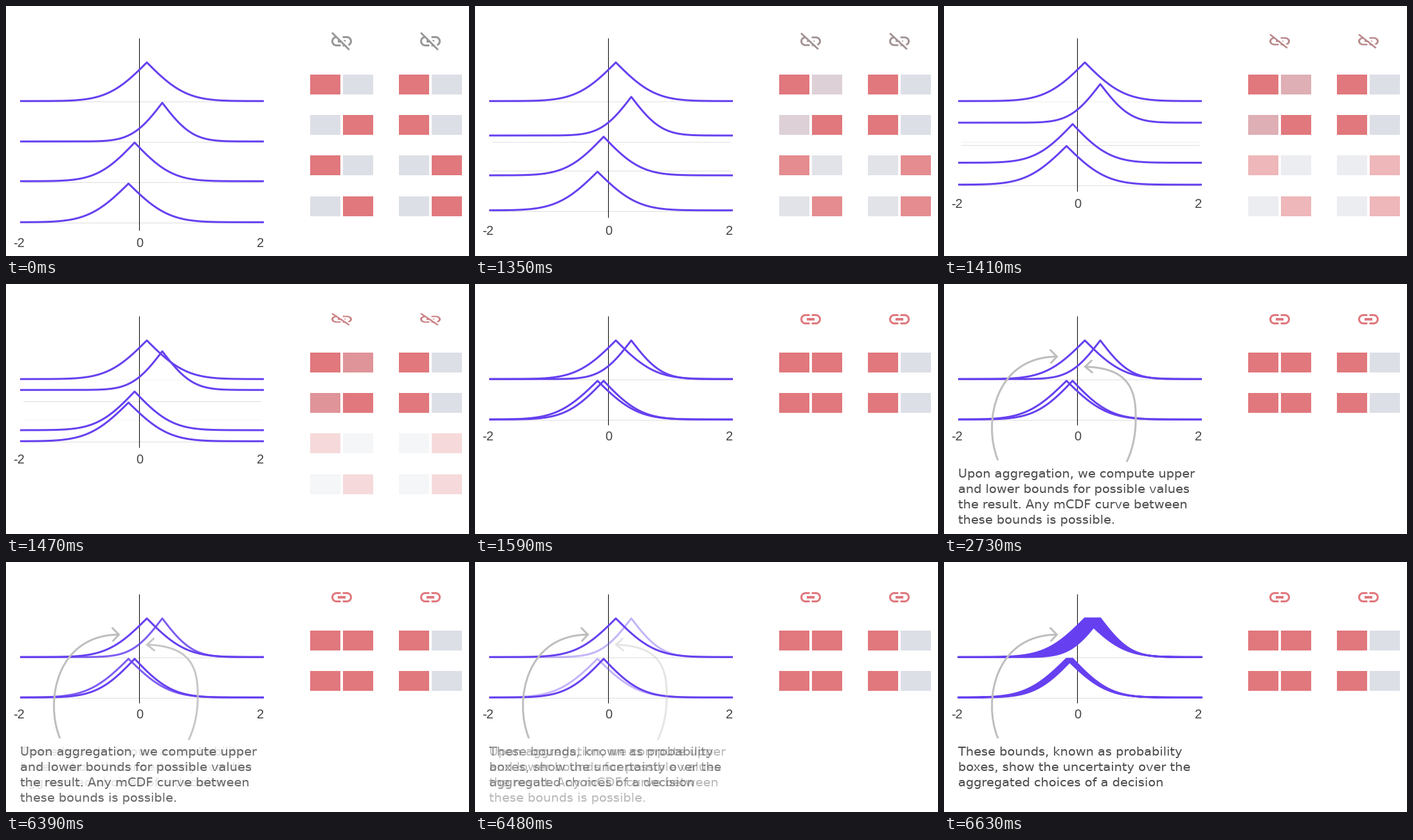
Write a matplotlib script that moves like this. It is 720 by 390 pixels and loops after 8 s.

```python
import math

import matplotlib.pyplot as plt
import numpy as np
from matplotlib.animation import FuncAnimation
from matplotlib.patches import PathPatch, Polygon, Rectangle
from matplotlib.path import Path

W, H, DPI = 720, 390, 100
PX = 72 / DPI
INTERVAL, LOOP, STEP = 20, 8000, 30
PITCH = 63

PURPLE, ARROW, INK = "#6640f0", "#bebebe", "#4e4e4e"
RED = np.array([224, 120, 125]) / 255
GREY = np.array([220, 223, 230]) / 255
ICON = np.full(3, 151) / 255

plt.rcParams["text.hinting"] = "no_autohint"
fig = plt.figure(figsize=(W / DPI, H / DPI), dpi=DPI, facecolor="white")
ax = fig.add_axes([0, 0, 1, 1])
ax.set_xlim(0, W)
ax.set_ylim(H, 0)
ax.axis("off")


def mix(a, b, p):
    return a + (b - a) * p


def progress(t, start, steps):
    """Ease-out that advances once per STEP and lands on the last one."""
    k = (t - start) // STEP + 1
    if k <= 0:
        return 0.0
    if k >= steps:
        return 1.0
    return math.sin(math.pi / 2 * (k - 0.12) / 9.36)


def polygon(pts, **style):
    return ax.add_patch(Polygon(pts, **style))


# --- folded normal CDF curves -------------------------------------------
X = np.linspace(22, 401, 759)
PEAK = 60.3
cdf = np.vectorize(lambda z: 0.5 * (1 + math.erf(z / math.sqrt(2))))


class Curve:
    def __init__(self, row, mid, sigma, start):
        self.mid, self.start = mid, start
        self.end = 148.3 + PITCH * (row // 2)
        self.height = 2 * PEAK * cdf(-np.abs(X - mid) / sigma)
        self.line, = ax.plot(X, start - self.height, color=PURPLE, lw=3 * PX,
                             zorder=3, solid_capstyle="butt",
                             solid_joinstyle="round")

    def slide(self, p):
        self.line.set_ydata(mix(self.start, self.end, p) - self.height)


curves = [Curve(0, 219, 48, 148.3), Curve(1, 243, 37, 211.3),
          Curve(2, 200, 46, 273.3), Curve(3, 190.5, 49, 337.3)]


def band(a, b):
    """Filled area between two curves with a flat top between the peaks."""
    top = np.maximum(a.height, b.height)
    low = np.minimum(a.height, b.height)
    top[(X - a.mid) * (X - b.mid) <= 0] = PEAK
    pts = np.r_[np.c_[X, a.end - top], np.c_[X, a.end - low][::-1]]
    return polygon(pts, fc=PURPLE, ec=PURPLE, lw=3 * PX, joinstyle="round",
                   zorder=4)


bands = [band(*curves[:2]), band(*curves[2:])]

# --- axis ---------------------------------------------------------------
GRID = [149.3 + PITCH * row for row in range(4)]
grid = [ax.plot([27, 397], [y, y], color="#dedede", lw=PX, zorder=1)[0]
        for y in GRID]
axis = ax.plot([207.2, 207.2], [50, 349.5], color="black", lw=PX,
               solid_capstyle="butt", zorder=2)[0]
ticks = [ax.text(x, 376, s, family="Liberation Sans", size=20 * PX,
                 color="#444444", ha="center", va="baseline", zorder=6)
         for x, s in ((20.3, "-2"), (208, "0"), (396, "2"))]

# --- boxes: two pairs per row, one red cell in each pair ----------------
joining, leaving = [], []
for row in range(4):
    for pair, red_side in enumerate((row % 2, row // 2)):
        for side in (0, 1):
            red = side == red_side
            box = ax.add_patch(Rectangle(
                (473 + 138 * pair + 51 * side, 107 + int(63.4 * row)), 47, 31,
                lw=0, fc=RED if red else GREY))
            if row > 1:
                leaving.append(box)
            elif pair == 0 and not red:
                joining.append(box)

# --- link icons, in 24-unit grid cells centred on (12, 12) --------------
def hook(side, open_top=True):
    """Half of a chain link: a half ring with straight ends."""
    a = np.radians(np.linspace(-90, 90, 40))
    rims = []
    for r in (5, 3.1):
        rim = np.c_[5 + r * np.cos(a), r * np.sin(a)]
        start = [[1, -r]] if open_top else []
        rims.append(np.array([*start, *rim, [1, r]]))
    return np.r_[rims[0], rims[1][::-1]] * (side, 1) + 12


def diagonal(lo, hi):
    """Strip along the main diagonal where lo < x - y < hi."""
    return np.array([((s + d) / 2, (s - d) / 2)
                     for s, d in ((6.27, lo), (6.27, hi),
                                  (39.74, hi), (39.74, lo))])


BAR = np.array([(8, 11), (16, 11), (16, 13), (8, 13)])


def place(parts, color):
    return [polygon((part - 12) * 1.6 + (cx, 55), lw=0, fc=color)
            for cx in (522, 660) for part in parts]


linked = place([hook(-1), hook(1), BAR], RED)
broken = place([hook(-1, False), hook(1), BAR], ICON)
gaps = place([diagonal(0.27, 2.81)], "white")
broken += place([diagonal(-2.27, 0.27)], ICON)
shapes = [(p, p.get_xy().copy()) for p in broken + gaps]


# --- arrows and captions ------------------------------------------------
def arrow(curve, head):
    codes = [Path.MOVETO] + [Path.CURVE4] * (len(curve) - 1)
    codes += [Path.MOVETO, Path.LINETO, Path.LINETO]
    return ax.add_patch(PathPatch(Path(curve + head, codes), fc="none",
                                  ec=ARROW, lw=3 * PX, capstyle="round",
                                  joinstyle="miter", zorder=5))


left_arrow = arrow([(83.5, 274), (60, 215), (80, 114), (175, 113.3)],
                   [(165.5, 103), (175.5, 113.3), (166.5, 123)])
right_arrow = arrow([(284.5, 276.5), (297, 250), (299, 222), (298, 200),
                     (297, 150), (272, 131), (220, 129)],
                    [(229.5, 119.5), (219.5, 129), (230.5, 138)])


def caption(*lines):
    return [ax.text(22, 302 + 24 * i, s, family="DejaVu Sans",
                    size=19.4 * PX, color=INK, va="baseline", zorder=6)
            for i, s in enumerate(lines)]


first = caption("Upon aggregation, we compute upper",
                "and lower bounds for possible values",
                "the result. Any mCDF curve between",
                "these bounds is possible.")
second = caption("These bounds, known as probability",
                 "boxes, show the uncertainty over the",
                 "aggregated choices of a decision")


def show(artists, on):
    for a in artists:
        a.set_visible(on)


def fade(artists, alpha):
    show(artists, alpha > 0)
    for a in artists:
        a.set_alpha(alpha)


def update(i):
    t = i * INTERVAL + INTERVAL // 2
    merge = progress(t, 1350, 9)
    note = progress(t, 2520, 8)
    fill = progress(t, 6390, 9)

    # curves slide into pairs, then each pair snaps to a filled band
    for curve in curves:
        curve.slide(merge)
    show([curves[0].line, curves[2].line], fill < 1)
    fade([curves[1].line, curves[3].line], 1 - fill)
    show(bands, fill >= 1)

    fade(grid[:2], 1 - merge)
    for line, y0, y1 in zip(grid[2:], GRID[2:], GRID):
        line.set_ydata([mix(y0, y1, merge)] * 2)
    axis.set_ydata([50, mix(349.5, 219.5, merge)])
    for label in ticks:
        label.set_y(mix(376, 244, merge))

    fade(leaving, 1 - merge)
    for box in joining:
        box.set_facecolor(mix(GREY, RED, merge))

    # the broken link is squashed to the height of the whole one
    for p, xy in shapes:
        p.set_xy((xy - (0, 55)) * (1, mix(1, 5 / 9, merge)) + (0, 55))
    for p in broken:
        p.set_facecolor(mix(ICON, RED, merge))
    show(broken + gaps, merge < 1)
    show(linked, merge >= 1)

    fade([left_arrow], note)
    fade([right_arrow], note * (1 - fill))
    fade(first, note * (1 - fill))
    fade(second, fill)
    return []


anim = FuncAnimation(fig, update, frames=LOOP // INTERVAL, interval=INTERVAL,
                     init_func=lambda: update(0), repeat=True, repeat_delay=0,
                     blit=False)
plt.show()
```
